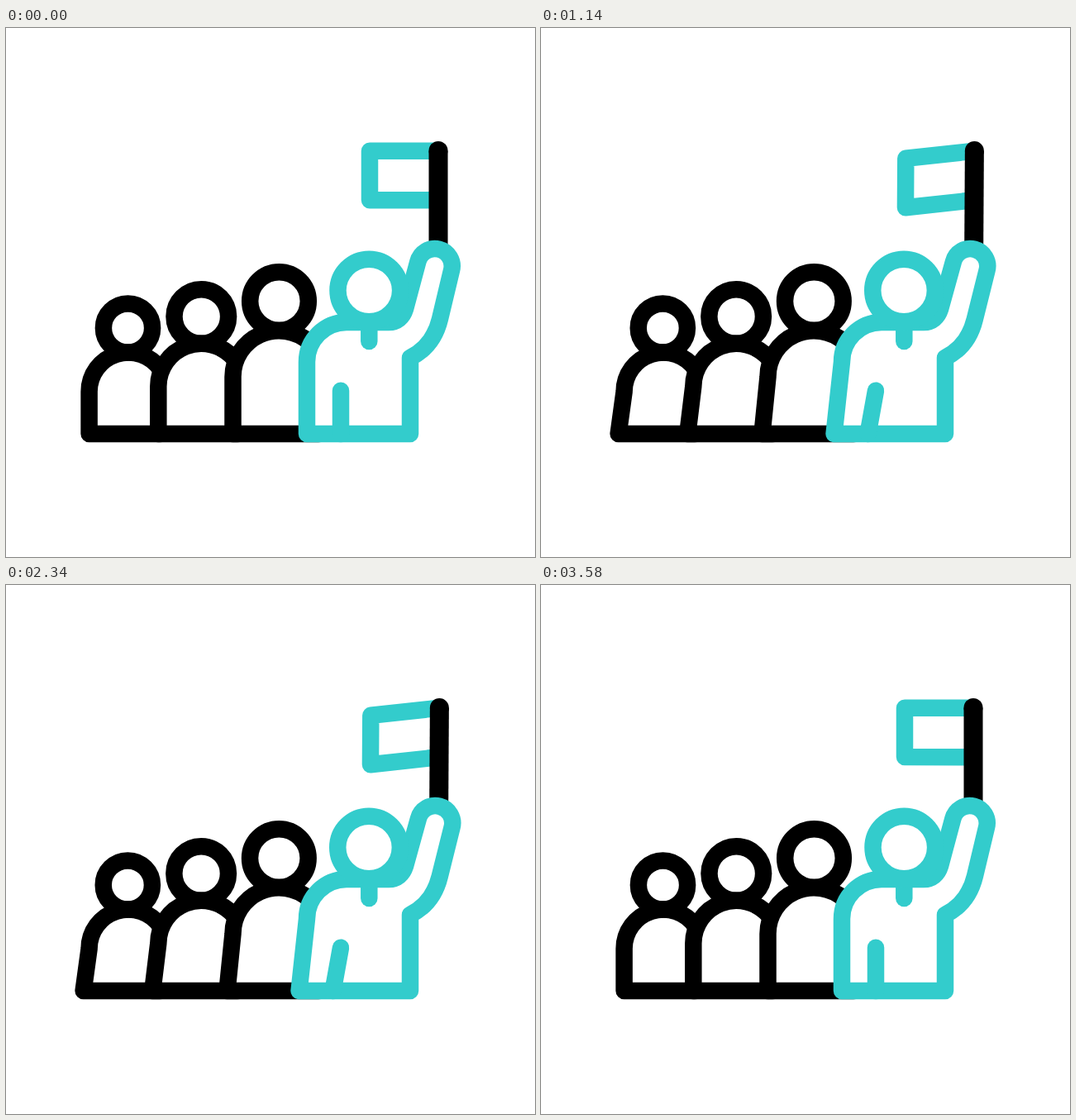
Animation of 640x640 px, one loop 3.6 s. Source, as an HTML page:

```html
<!DOCTYPE html>
<html lang="en">
<head>
<meta charset="utf-8">
<title>Team leader with flag</title>
<style>
  html, body { margin: 0; width: 100%; height: 100%; overflow: hidden; background: #fff; }
  svg { display: block; width: 100vw; height: 100vh; }
  path, circle { stroke: #000; stroke-width: 20.5; stroke-linecap: round; stroke-linejoin: round; fill: none; }
  .body { fill: #fff; }
  .teal { stroke: #33cccc; }
  .pole { stroke-width: 23; stroke-linecap: butt; }
</style>
</head>
<body>
<svg id="stage" viewBox="0 0 640 640"></svg>
<script>
const LOOP = 3600;
const SWING = [0, 600, 1200, 1800, 2400, 3000, 3500];
const WAVE = [0, 700, 1300, 1900, 2500, 3100, 3600];
const stage = document.getElementById('stage');

// Shoulder arc (cx, cy, r), arc end, base end, head (x, y, r) and head shift
const followers = [
  { cx: 148, cy: 440, r: 47.4, end: [187, 413], base: 186, head: [147.5, 363, 29.6], lean: -6.5 },
  { cx: 236.3, cy: 433.5, r: 52, end: [275, 399], base: 280, head: [236.3, 349, 32.8], lean: -5.5 },
  { cx: 330.3, cy: 422, r: 55.8, end: [367, 380], base: 378, head: [330.5, 330.5, 35.3], lean: -5.7 }
];

function add(tag, cls, parent = stage) {
  const el = document.createElementNS('http://www.w3.org/2000/svg', tag);
  if (cls) el.setAttribute('class', cls);
  return parent.appendChild(el);
}

function addHead([x, y, r], cls) {
  const el = add('circle', cls);
  el.setAttribute('cx', x);
  el.setAttribute('cy', y);
  el.setAttribute('r', r);
  return el;
}

const setPath = (el, d) => el.setAttribute('d', d);
const mix = (a, b, k) => a + (b - a) * k;
const ease = p => p * p * (3 - 2 * p);

// Eased value that swings between hi and lo, starting and ending at rest
function track(t, times, hi, lo) {
  const values = [0, hi, lo, hi, lo, hi, 0];
  for (let i = 1; i < times.length; i++) {
    if (t < times[i]) {
      const p = (t - times[i - 1]) / (times[i] - times[i - 1]);
      return mix(values[i - 1], values[i], ease(p));
    }
  }
  return 0;
}

const banner = add('g');
const flag = add('path', 'teal', banner);
const pole = add('path', 'pole', banner);
const knob = add('circle', '', banner);
setPath(pole, 'M0 0V117');
knob.setAttribute('r', 11.5);
knob.style.cssText = 'stroke:none;fill:#000';

for (const f of followers) {
  f.body = add('path', 'body');
  f.face = addHead(f.head);
}
const leader = add('path', 'body teal');
const leg = add('path', 'teal');
const collar = add('path', 'teal');
const leaderHead = addHead([439.3, 317.5, 37.8], 'teal');
setPath(collar, 'M439.3 356V379');

function drawBanner(a, wave) {
  const x = mix(523, 573.5, a);
  const y = mix(148.5, 151, a) - 4 * a * (1 - a);
  banner.setAttribute('transform', `translate(${x} ${y}) rotate(${12.4 * a})`);
  const lift = 83 * Math.tan(wave * Math.PI / 180);
  setPath(flag, `M0 .3L-83 ${.3 - lift}V${59.7 - lift}L0 59.7`);
}

function drawLeader(a, step) {
  const m = (p, q) => mix(p, q, a);
  const hx = m(518.7, 538.6), hy = m(288, 289.2);
  const tilt = m(14.2, 29.6) * Math.PI / 180;
  const dx = 21 * Math.cos(tilt), dy = 21 * Math.sin(tilt);
  setPath(leader, `M${364 + step} 491H489V399
    C${m(509, 502)} ${m(389, 392)} ${m(520, 511)} ${m(373, 380)} ${m(525, 516)} ${m(352, 371)}
    L${hx + dx} ${hy + dy}A21 21 0 0 0 ${hx - dx} ${hy - dy}
    L${m(483, 486)} ${m(340, 341)}
    C${m(480, 481)} 350 ${m(473, 475)} 356 ${m(463, 466)} 356
    H412A48 48 0 0 0 364 404Z`);
  setPath(leg, `M405 438.7L${405 + step} 491`);
  leaderHead.setAttribute('transform', `translate(${-9.2 * a})`);
}

function drawFollower(f, a, step) {
  const x = f.cx - f.r;
  setPath(f.body, `M${f.base} 491H${x + step}L${x} ${f.cy}A${f.r} ${f.r} 0 0 1 ${f.end}`);
  f.face.setAttribute('transform', `translate(${f.lean * a})`);
}

function frame() {
  const t = performance.now() % LOOP;
  const arm = track(t, SWING, 1, 0);
  const step = track(t, SWING, 3.7, -7.3);
  drawBanner(arm, track(t, WAVE, 12.8, -10.6));
  for (const f of followers) drawFollower(f, arm, step);
  drawLeader(arm, track(t, SWING, 10.2, -10));
  requestAnimationFrame(frame);
}
frame();
</script>
</body>
</html>
```
